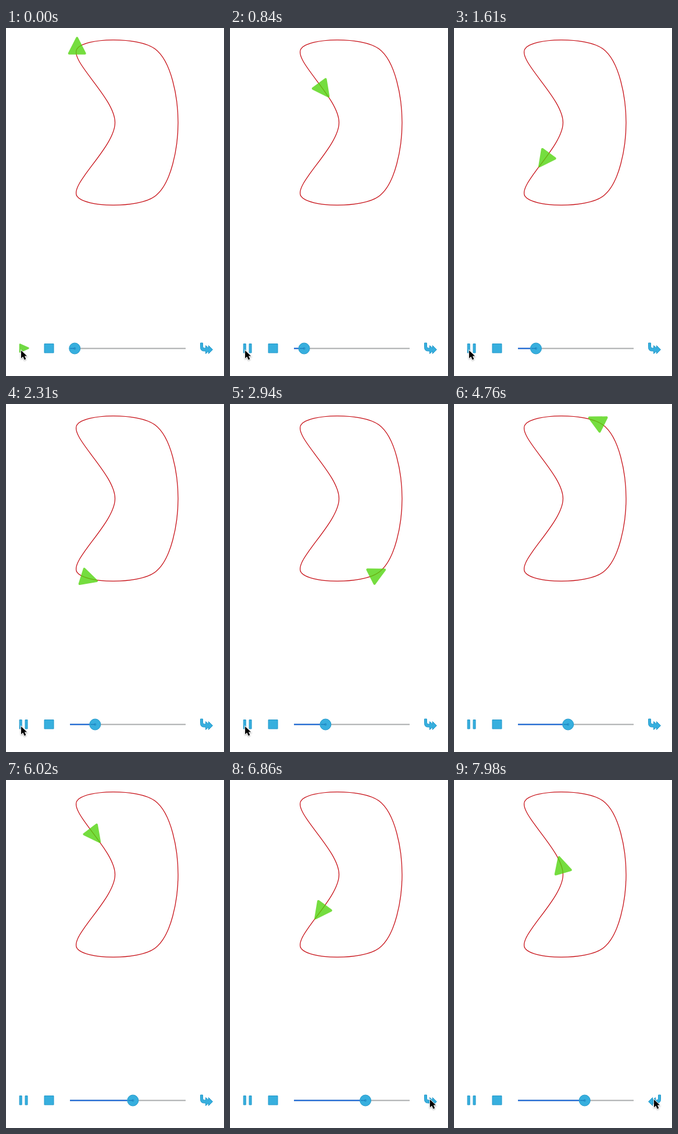
Write an HTML page that moves like this. It is 375 px wide and 600 px high and loops after 8 s.

```html
<!DOCTYPE html>
<html lang="en">
<head>
<meta charset="utf-8">
<title>Path player</title>
<style>
  html, body { margin: 0; width: 100%; height: 100%; overflow: hidden; background: #fff; }
  svg { display: block; width: 375px; height: 600px; }
  .control { fill: #37afde; stroke: #2399cb; }
</style>
</head>
<body>
<svg viewBox="0 0 375 600">
  <path id="track" fill="none" stroke="#c60d14" stroke-width="1.25"/>
  <path id="arrow" d="M0-18.5 13.5 8H-13.5Z" fill="#53d510" stroke="#53d510" stroke-width="4" stroke-linejoin="round" opacity=".8"/>

  <path id="play" d="M24 545.5 38.5 552 24 558.5Z" fill="#70d943" stroke="#70d943" stroke-width="2.5" stroke-linejoin="round"/>
  <path id="pause" class="control" d="M23.2 544.5h4v15.5h-4zM33 544.5h4v15.5h-4z"/>
  <path class="control" d="M66 544.5h16v15.5h-16z"/>

  <path d="M110 552.5H309" stroke="#a9abac" stroke-width="2"/>
  <path id="progress" stroke="#0f62da" stroke-width="2"/>
  <g id="thumb">
    <circle class="control" r="9.5"/>
    <path d="M-8 0H0" stroke="#1c83c0" stroke-width="1.5"/>
    <circle r="1.5" fill="none" stroke="#1c83c0"/>
  </g>

  <path id="direction" class="control" d="M334.5 543h4v6q0 3 3 3h2v-4.500l5 4.300v-4.300l7 7-7 7v-4.300l-5 4.300v-4.500h-3q-6 0-6-6.500z"/>

  <path id="cursor" d="M0 0V13.500L3.200 10.600 5.700 16 8.300 14.800 5.900 9.600H10Z" stroke="#fff" stroke-width="1.6" paint-order="stroke" style="filter:drop-shadow(0 1px 1px #0005)"/>
</svg>
<script>
const LOOP = 8000, START = 310, TURN = 7187, LAP = 5250;
const knots = [[122.2, 35.8], [187.5, 163], [122.2, 290.2], [256, 290.2], [296, 163], [256, 35.8]];
const $ = id => document.getElementById(id);
const knot = i => knots[(i + knots.length) % knots.length];

// Each segment takes time in proportion to its chord.
const chord = i => Math.hypot(knot(i + 1)[0] - knot(i)[0], knot(i + 1)[1] - knot(i)[1]);
const perimeter = knots.reduce((sum, _, i) => sum + chord(i), 0);

// Velocity at a knot: the neighbouring chords' velocities, weighted by nearness.
function velocity(i, axis) {
  const before = chord(i - 1), after = chord(i);
  const arriving = (knot(i)[axis] - knot(i - 1)[axis]) / before;
  const leaving = (knot(i + 1)[axis] - knot(i)[axis]) / after;
  return (arriving * after + leaving * before) / (before + after);
}

function spline(i, t, axis) {
  const a = knot(i)[axis], b = knot(i + 1)[axis];
  const m = velocity(i, axis) * chord(i), n = velocity(i + 1, axis) * chord(i);
  const c2 = 3 * (b - a) - 2 * m - n, c3 = 2 * (a - b) + m + n;
  return { value: a + t * (m + t * (c2 + t * c3)), speed: m + t * (2 * c2 + 3 * t * c3) };
}

function locate(laps) {
  let rest = laps % 1 * perimeter, i = 0;
  while (rest > chord(i)) rest -= chord(i++);
  const t = rest / chord(i);
  return [spline(i, t, 0), spline(i, t, 1)];
}

function drawTrack() {
  let d = `M${knot(0)}`;
  knots.forEach((p, i) => {
    const q = knot(i + 1), third = chord(i) / 3;
    const out = p.map((v, axis) => v + velocity(i, axis) * third);
    const into = q.map((v, axis) => v - velocity(i + 1, axis) * third);
    d += `C${out} ${into} ${q}`;
  });
  $('track').setAttribute('d', d + 'Z');
}

const show = (id, on) => $(id).setAttribute('visibility', on ? 'visible' : 'hidden');
const transform = (id, value) => $(id).setAttribute('transform', value);
const ease = (t, from, to) => {
  const p = Math.min(1, Math.max(0, (t - from) / (to - from)));
  return p * p * (3 - 2 * p);
};

function render(t) {
  const playing = t >= START, reversed = t >= TURN;
  const laps = Math.max(0, Math.min(t, 2 * TURN - t) - START) / LAP;

  const [x, y] = locate(laps);
  const heading = Math.atan2(y.speed, x.speed) * 180 / Math.PI + (reversed ? -90 : 90);
  transform('arrow', `translate(${x.value} ${y.value}) rotate(${playing ? heading : 0})`);

  show('play', !playing);
  show('pause', playing);
  const thumbX = 118.2 + 92 * laps;
  $('progress').setAttribute('d', `M110 552.5H${thumbX}`);
  transform('thumb', `translate(${thumbX} 552.5)`);
  transform('direction', reversed ? 'translate(690 0) scale(-1 1)' : '');

  // The pointer leaves below the play button and returns from the right.
  const leaving = ease(t, 3780, 3960), entering = ease(t, 6370, 6600);
  show('cursor', t < 3960 || t >= 6370);
  transform('cursor', t < 5000
    ? `translate(${26 - leaving} ${556 + 17 * leaving})`
    : `translate(${357.5 - 13.5 * entering} 551)`);
}

drawTrack();
const begin = performance.now();
(function tick() {
  render((performance.now() - begin) % LOOP);
  requestAnimationFrame(tick);
})();
</script>
</body>
</html>
```
